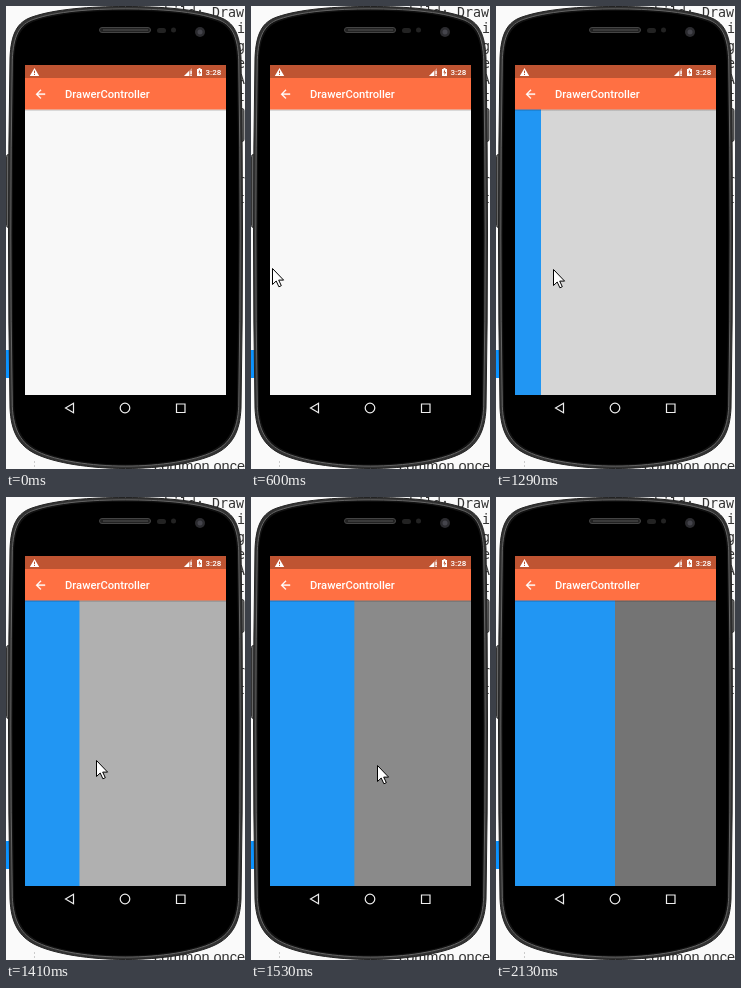
Animation of 239x463 px, one loop 2.88 s. Source, as an HTML page:

```html
<!DOCTYPE html>
<html lang="en">
<head>
<meta charset="utf-8">
<title>Drawer demo</title>
<style>
  html, body { margin: 0; width: 100%; height: 100%; overflow: hidden; background: #fafafa; }
  svg { display: block; width: 239px; height: 463px; }
  .code { font: 13.3px "DejaVu Sans Mono", monospace; fill: #333; }
  .ui { font-family: Roboto, sans-serif; font-weight: 500; fill: #fff; }
</style>
</head>
<body>
<svg viewBox="0 0 239 463">
  <defs>
    <linearGradient id="shade" x2="0" y2="1">
      <stop offset="0" stop-opacity=".25"/>
      <stop offset="1" stop-opacity="0"/>
    </linearGradient>
    <path id="body" d="M119.500 .5C155 .5 190 3 213 11C228 16 234 28 235 52Q238 231 235 402C234 426 226 440 209 448C190 457 155 462.500 119.500 462.500S49 457 30 448C13 440 5 426 4 402Q1 231 4 52C5 28 11 16 26 11C49 3 84 .5 119.500 .5z"/>
  </defs>

  <!-- page behind the phone -->
  <g class="code">
    <text x="238" y="11" text-anchor="end">child: Draw</text>
    <text x="231" y="27">i</text>
    <text x="231" y="45">g</text>
    <text x="231" y="62">e</text>
    <text x="231" y="78">A</text>
    <text x="231" y="95">t</text>
    <text x="231" y="179">r</text>
    <text x="231" y="197">t</text>
  </g>
  <text x="239" y="465" text-anchor="end" font-family="Liberation Sans, sans-serif" font-size="14.5" fill="#333">common once</text>
  <path d="M28.500 455v8" stroke="#ccc" stroke-dasharray="2"/>
  <path d="M0 344h5v28H0z" fill="#0b93ff"/>

  <!-- phone -->
  <rect x=".5" y="148.500" width="6" height="73" rx="2" fill="#666" stroke="#333"/>
  <rect x="232" y="102.500" width="6" height="33" rx="2" fill="#666" stroke="#333"/>
  <use href="#body" fill="#333" stroke="#222"/>
  <use href="#body" transform="translate(2.400 2.400) scale(.98 .9896)" fill="#111" stroke="#666"/>
  <use href="#body" transform="translate(4.200 4.200) scale(.965 .982)"/>
  <rect x="93.500" y="21.500" width="51" height="5" rx="2.500" fill="#222" stroke="#444"/>
  <path d="M97 24h45" stroke="#3a3a3a" stroke-width="2"/>
  <rect x="151" y="22" width="9" height="5" rx="2.500" fill="#222"/>
  <circle cx="167.500" cy="24" r="2.500" fill="#222"/>
  <circle cx="194" cy="26" r="5" fill="#2b2b2f"/>
  <circle cx="194" cy="26" r="2.500" fill="#45454c"/>

  <!-- app -->
  <path d="M19 103h201v286H19z" fill="#f8f8f8"/>
  <path id="scrim" d="M19 103h201v286H19z" opacity="0"/>
  <rect id="drawer" x="19" y="103" width="0" height="286" fill="#2196f3"/>
  <path d="M19 103.500h201v2H19z" fill="url(#shade)"/>
  <path d="M19 59h201v13H19z" fill="#bf5432"/>
  <path d="M19 72h201v31.500H19z" fill="#ff7043"/>
  <path d="M28.500 62l4.700 8h-9.400z" fill="#fff"/>
  <path d="M28.500 64.700v2.500m0 .8v1" stroke="#bf5432"/>
  <path d="M186 62v8h-8z" fill="#fff" opacity=".4"/>
  <path d="M183 65v5h-5zM184.500 65h1.200v3h-1.200zm0 4h1.200v1h-1.200z" fill="#fff"/>
  <path d="M191 63h1.500v-1h2v1h1.500v7h-5z" fill="#fff"/>
  <path d="M194 63.500l-1.700 3h1.200v2.500l1.700-3H194z" fill="#bf5432"/>
  <text class="ui" x="199.500" y="69" font-size="8">3:28</text>
  <path transform="translate(27.500 81.200) scale(.58)" d="M20 11H7.830l5.590-5.590L12 4l-8 8 8 8 1.410-1.410L7.830 13H20z" fill="#fff" stroke="#fff" stroke-width=".4"/>
  <text class="ui" x="59" y="92" font-size="11.200">DrawerController</text>
  <g fill="none" stroke="#eee" stroke-width="1.200">
    <path d="M67.500 397.200v9.600L59.500 402z"/>
    <circle cx="119" cy="402" r="4.800"/>
    <path d="M170.500 398h8.500v8.500h-8.500z"/>
  </g>

  <path id="cursor" d="M.5 .5v16l3.700-3.500 2.700 5.800 2.400-1.100-2.600-5.600h4.900z" fill="#fff" stroke="#000"/>
</svg>
<script>
const LOOP = 2880, STEP = 30, FULL = 100;
const get = id => document.getElementById(id);
const scrim = get('scrim'), drawer = get('drawer'), cursor = get('cursor');

// keys: [time, ...values]
const pointer = [
  [150, 195, 88], [240, 150, 141], [360, 85, 212], [480, 39, 250], [600, 21, 262],
  [1199, 21, 262], [1200, 25, 263], [1290, 57, 263], [1470, 106, 263],
  [1590, 146, 272], [1710, 175, 291], [1830, 175, 291],
  [1920, 184, 277], [2010, 207, 235], [2130, 240, 170]
];
const reveal = [[1210, 0], [1290, 26], [1470, 68.7], [1590, FULL]];

function at(keys, t) {
  const i = keys.findIndex(k => k[0] > t);
  if (i < 0) return keys[keys.length - 1].slice(1);
  if (!i) return keys[0].slice(1);
  const a = keys[i - 1], b = keys[i], f = (t - a[0]) / (b[0] - a[0]);
  return a.slice(1).map((v, j) => v + (b[j + 1] - v) * f);
}

function draw(now) {
  const t = Math.floor(now % LOOP / STEP) * STEP;
  const [x, y] = at(pointer, t).map(Math.round);
  const [w] = at(reveal, t);
  cursor.setAttribute('transform', `translate(${x} ${y})`);
  cursor.setAttribute('visibility', t >= 150 && t < 2130 ? 'visible' : 'hidden');
  drawer.setAttribute('width', w);
  scrim.setAttribute('opacity', .53 * w / FULL);
}

let start;
function tick(now) {
  start ??= now;
  draw(now - start);
  requestAnimationFrame(tick);
}
draw(0);
requestAnimationFrame(tick);
</script>
</body>
</html>
```
